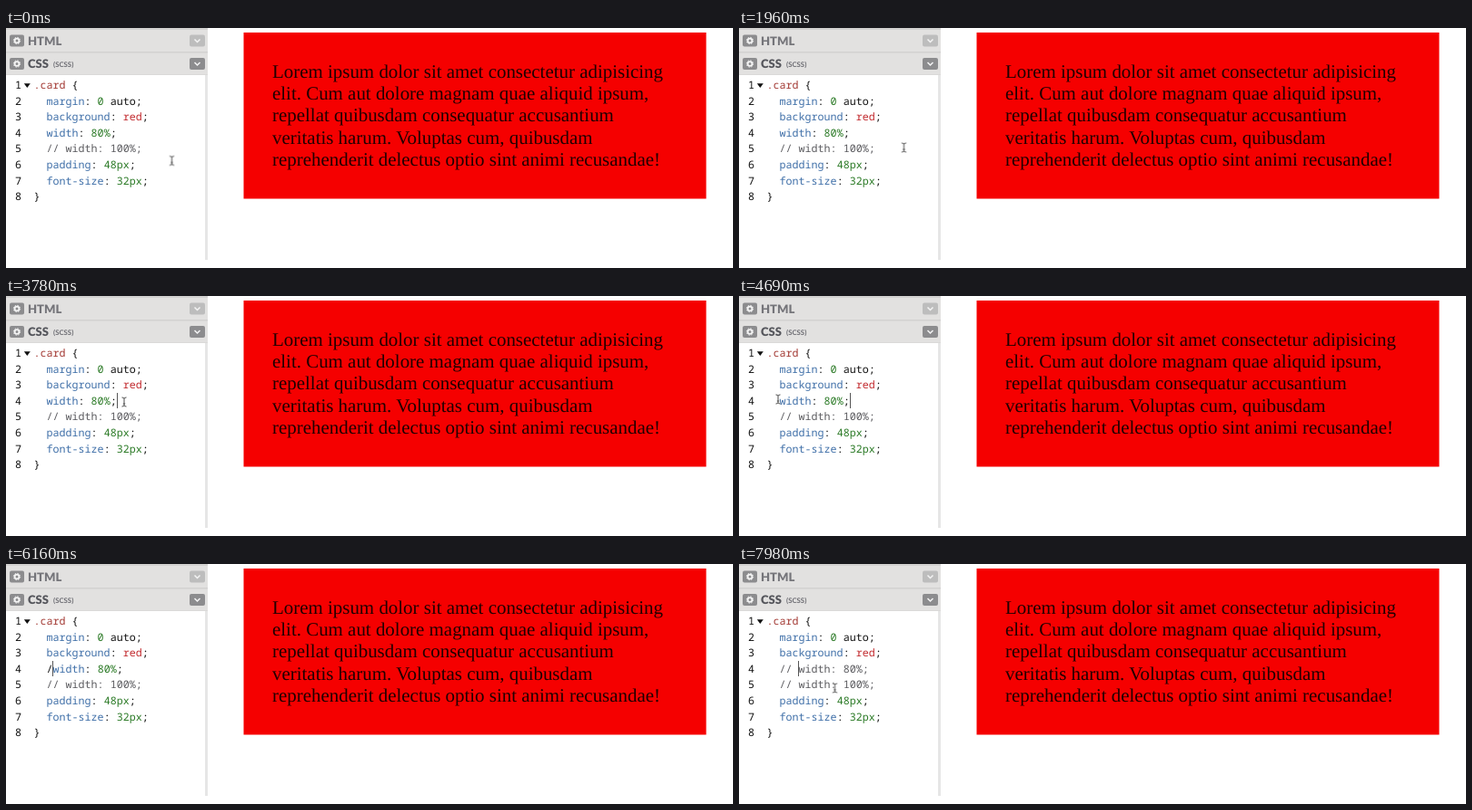
Write an HTML page that moves like this. It is 800 px wide and 265 px high and loops after 8 s.

```html
<!DOCTYPE html>
<html lang="en">
<head>
<meta charset="utf-8">
<title>Card width</title>
<style>
html, body { margin: 0; width: 100%; height: 100%; overflow: hidden; background: #fff; }
svg { display: block; width: 800px; height: 265px; text-rendering: geometricPrecision; }

.head { font: 900 13px Lato, sans-serif; fill: #55565c; }
.head .dim { fill: #75757a; }
.head .small { font-size: 7.8px; font-weight: 700; fill: #6c6c72; }
.code { font: 500 11.7px "Noto Sans Mono", monospace; fill: #111; }
.code text { white-space: pre; }
.s { fill: #a33a34; }
.p { fill: #3f6fa8; }
.n { fill: #2b7a26; }
.k { fill: #c22a2e; }
.c { fill: #5c5c60; }
.prose { font: 20.93px "Liberation Serif", "Times New Roman", serif; fill: #200000; }

.loop { animation: 8s infinite; }
.hard { animation-timing-function: step-end; }
.plain { animation-name: plain; }
.slash { animation-name: slash; }
.double { animation-name: double; }
.spaced { animation-name: spaced; }
.caret { animation-name: caret; }
.pointer { animation-name: move; animation-timing-function: ease-in-out; }
.beam { animation-name: hide; }

@keyframes plain { 0% { visibility: visible; } 74.375%, 100% { visibility: hidden; } }
@keyframes slash { 0%, 80% { visibility: hidden; } 74.375% { visibility: visible; } 100% { visibility: hidden; } }
@keyframes double { 0%, 94.5% { visibility: hidden; } 80% { visibility: visible; } 100% { visibility: hidden; } }
@keyframes spaced { 0% { visibility: hidden; } 94.5%, 100% { visibility: visible; } }
@keyframes caret {
  0% { opacity: 0; transform: translateX(122px); }
  45%, 58.25% { opacity: 1; transform: translateX(122px); }
  51.625% { opacity: 0; transform: translateX(122px); }
  65% { opacity: 1; transform: translateX(44.5px); }
  71.625% { opacity: 0; transform: translateX(44.5px); }
  74.375% { opacity: 1; transform: translateX(51px); }
  80%, 93.25% { opacity: 1; transform: translateX(58px); }
  86.625% { opacity: 0; transform: translateX(58px); }
  94.5%, 100% { opacity: 1; transform: translateX(65px); }
}
@keyframes move {
  0%, 3% { transform: translate(182.5px, 146.5px); }
  10.5%, 26% { transform: translate(181.5px, 132px); }
  33.5%, 38% { transform: translate(173.5px, 125px); }
  44%, 48.5% { transform: translate(130px, 117px); }
  58.2%, 65% { transform: translate(43px, 114px); }
  80% { transform: translate(46px, 117px); }
  88%, 94.5% { transform: translate(59.5px, 131.5px); }
  99.6%, 100% { transform: translate(105.5px, 137px); }
}
@keyframes hide {
  0%, 84%, 97% { visibility: visible; }
  74.375%, 94.5% { visibility: hidden; }
  100% { visibility: visible; }
}
</style>
</head>
<body>
<svg viewBox="0 0 800 265">
  <defs>
    <rect id="bar" width="222" height="24" fill="#e2e1e0"/>
    <g id="gear">
      <rect x="4" y="6" width="16" height="13" rx="2" fill="#8c8c8e"/>
      <circle cx="12" cy="12.5" r="2.4" fill="none" stroke="#f4f4f4" stroke-width="1.8"/>
      <circle cx="12" cy="12.5" r="3.7" fill="none" stroke="#f4f4f4" stroke-dasharray="1.45"/>
    </g>
    <g id="drop">
      <rect x="202" y="6" width="17" height="13" rx="2"/>
      <path d="M207.5 11l3 3 3-3" fill="none" stroke="#f4f4f4" stroke-width="1.5"/>
    </g>
    <path id="ibeam" d="M-2.5 -5Q0 -5 0 -3.5Q0 -5 2.5 -5M0 -3.5V3.5M-2.5 5Q0 5 0 3.5Q0 5 2.5 5"/>
  </defs>

  <rect x="219" width="3" height="256" fill="#e6e6e6"/>
  <rect width="222" height="52" fill="#d3d2d1"/>
  <use href="#bar" y="2"/>
  <use href="#bar" y="27.5"/>
  <use href="#gear" y="1.5"/>
  <use href="#gear" y="27"/>
  <use href="#drop" y="1.5" fill="#bdbdbd"/>
  <use href="#drop" y="27" fill="#8c8c8e"/>
  <g class="head">
    <text class="dim" x="24" y="19">HTML</text>
    <text x="24" y="44.3">CSS</text>
    <text class="small" x="52" y="43.3">(SCSS)</text>
  </g>

  <g class="code">
    <g id="numbers"></g>
    <path d="M19.8 61.3h7l-3.5 4.6z"/>
    <text x="30.5" y="67"><tspan class="s">.card</tspan> {</text>
    <text x="44.5" y="84.6"><tspan class="p">margin</tspan>: <tspan class="n">0</tspan> auto;</text>
    <text x="44.5" y="102.2"><tspan class="p">background</tspan>: <tspan class="k">red</tspan>;</text>
    <text class="loop hard plain" x="44.5" y="119.8"><tspan class="p">width</tspan>: <tspan class="n">80%</tspan>;</text>
    <text class="loop hard slash" x="44.5" y="119.8">/<tspan class="p">width</tspan>: <tspan class="n">80%</tspan>;</text>
    <text class="c loop hard double" x="44.5" y="119.8">//width: 80%;</text>
    <text class="c loop hard spaced" x="44.5" y="119.8">// width: 80%;</text>
    <text class="c" x="44.5" y="137.4">// width: 100%;</text>
    <text x="44.5" y="155"><tspan class="p">padding</tspan>: <tspan class="n">48px</tspan>;</text>
    <text x="44.5" y="172.6"><tspan class="p">font-size</tspan>: <tspan class="n">32px</tspan>;</text>
    <text x="30.5" y="190.2">}</text>
  </g>

  <rect x="261.5" y="5" width="509" height="183.5" fill="#f50000"/>
  <g class="prose">
    <text x="293" y="55">Lorem ipsum dolor sit amet consectetur adipisicing</text>
    <text x="293" y="79.2">elit. Cum aut dolore magnam quae aliquid ipsum,</text>
    <text x="293" y="103.4">repellat quibusdam consequatur accusantium</text>
    <text x="293" y="127.6">veritatis harum. Voluptas cum, quibusdam</text>
    <text x="293" y="151.8">reprehenderit delectus optio sint animi recusandae!</text>
  </g>

  <rect class="loop hard caret" y="107" width="1" height="17" fill="#555"/>
  <g class="loop pointer">
    <g class="loop hard beam" fill="none">
      <use href="#ibeam" stroke="#fff" stroke-width="2.2" opacity=".7"/>
      <use href="#ibeam" stroke="#4a4a4a"/>
      <path d="M-1.2 2h2.4" stroke="#4a4a4a"/>
    </g>
  </g>
</svg>
<script>
const numbers = document.getElementById("numbers");
for (let i = 0; i < 8; i++) {
  const label = document.createElementNS("http://www.w3.org/2000/svg", "text");
  label.setAttribute("x", 10);
  label.setAttribute("y", 67 + i * 17.6);
  label.textContent = i + 1;
  numbers.append(label);
}
</script>
</body>
</html>
```
